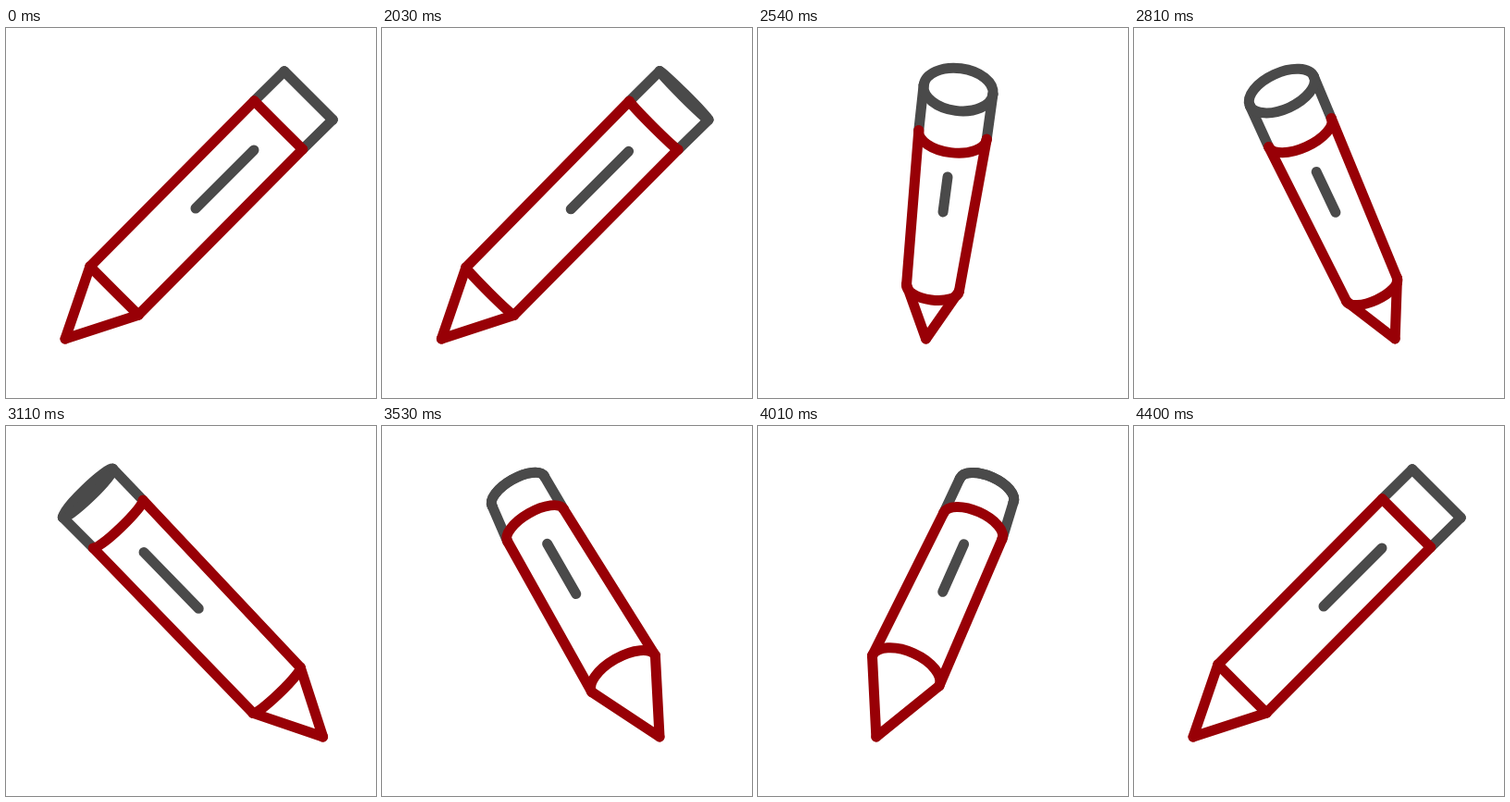
Animation of 400x400 px, one loop 4.43 s. Source, as an HTML page without scripts:

```html
<!DOCTYPE html>
<html lang="en">
<head>
<meta charset="utf-8">
<title>Turning pencil</title>
<style>
@property --turn { syntax: "<angle>"; inherits: true; initial-value: 0deg; }
@property --c { syntax: "<number>"; inherits: true; initial-value: 1; }
@property --s { syntax: "<number>"; inherits: true; initial-value: 0; }
@property --s2 { syntax: "<number>"; inherits: true; initial-value: 0; }
@property --k { syntax: "<number>"; inherits: true; initial-value: 0; }
@property --d { syntax: "<number>"; inherits: true; initial-value: 0; }
@property --ux { syntax: "<number>"; inherits: true; initial-value: 1; }
@property --uy { syntax: "<number>"; inherits: true; initial-value: 0; }

html, body { margin: 0; width: 100%; height: 100%; overflow: hidden; background: #fff; }

svg {
  display: block;
  width: 100%;
  height: 100%;
  fill: none;
  stroke-width: 11;
  stroke-linecap: round;
  animation: turn 4430ms infinite;

  /* Harmonics of the turn */
  --c: cos(var(--turn));
  --s: sin(var(--turn));
  --s2: calc(var(--s) * var(--s));
  --k: calc(cos(3 * var(--turn)) - var(--c));
  --d: sin(2 * var(--turn));

  /* Centre and half width of each section, from point to eraser */
  --tip-x: calc(205 - 141 * var(--c) + 2.3 * var(--k));
  --tip-y: 336;
  --neck-x: calc(205 - 88 * var(--c) + 1.8 * var(--k) - 3.8 * var(--d));
  --neck-y: calc(284 + 10.7 * var(--s) - 13.9 * var(--s2));
  --neck-w: calc(37 - 5.6 * var(--s) - 2.9 * var(--s2));
  --band-x: calc(205 + 89.5 * var(--c) + 13.4 * var(--k) - 1 * var(--d));
  --band-y: calc(105 + 2.9 * var(--s) + 7.8 * var(--s2));
  --band-w: calc(37 + 1.5 * var(--s) - 1.5 * var(--s2));
  --end-x: calc(205 + 122 * var(--c) + 13.2 * var(--k) + 1.7 * var(--d));
  --end-y: calc(73 - .9 * var(--s) - 5.7 * var(--s2));
  --end-w: calc(37 + 3.7 * var(--s) - 3 * var(--s2));
  --end-depth: calc(20.5 + 2.8 * var(--s));

  /* Unit vector across the pencil */
  --dx: calc(var(--end-x) - var(--tip-x));
  --dy: calc(var(--tip-y) - var(--end-y));
  --ux: calc(var(--dy) / hypot(var(--dx), var(--dy)));
  --uy: calc(var(--dx) / hypot(var(--dx), var(--dy)));
}

@keyframes turn {
  0%, 45.1% { --turn: 0deg; animation-timing-function: steps(80); }
  99.3%, 100% { --turn: 360deg; }
}

path { vector-effect: non-scaling-stroke; }
.red { stroke: #980006; }
.gray { stroke: #4a4a4a; }

.tip { --x: var(--tip-x); --y: var(--tip-y); --w: 0; --to-x: var(--neck-x); --to-y: var(--neck-y); --to-w: var(--neck-w); }
.body { --x: var(--neck-x); --y: var(--neck-y); --w: var(--neck-w); --to-x: var(--band-x); --to-y: var(--band-y); --to-w: var(--band-w); }
.eraser { --x: var(--band-x); --y: var(--band-y); --w: var(--band-w); --to-x: var(--end-x); --to-y: var(--end-y); --to-w: var(--end-w); }
.slot {
  --w: 0;
  --to-w: 0;
  --x: calc(268 - 63 * (1 - var(--c)) + 13.3 * var(--k) - 5.5 * var(--d));
  --y: calc(132 + 16.3 * var(--s) + 13.2 * var(--s2));
  --to-x: calc(205 + 6 * var(--k) - 4.3 * var(--d));
  --to-y: calc(195 + 11.7 * var(--s) - 7.8 * var(--s2));
}

.left { --side: -1; }
.right { --side: 1; }
.line {
  --x1: calc(var(--x) + var(--side) * var(--w) * var(--ux));
  --y1: calc(var(--y) + var(--side) * var(--w) * var(--uy));
  --lx: calc(var(--to-x) + var(--side) * var(--to-w) * var(--ux) - var(--x1));
  --ly: calc(var(--to-y) + var(--side) * var(--to-w) * var(--uy) - var(--y1));
  transform: matrix(calc(var(--lx)), calc(var(--ly)), calc(-1 * var(--ly)), calc(var(--lx)), calc(var(--x1)), calc(var(--y1)));
}

.neck { --x: var(--neck-x); --y: var(--neck-y); --w: var(--neck-w); --v: calc(var(--s) * (19.3 - 6.2 * var(--s)) + .05); }
.band { --x: var(--band-x); --y: var(--band-y); --w: var(--band-w); --v: calc(var(--s) * 19.5 + .05); }
.front, .back { --x: var(--end-x); --y: var(--end-y); --w: var(--end-w); }
.front { --v: calc(var(--s) * var(--end-depth) + .05); }
.back { --v: calc(-1 * max(var(--s), -1 * var(--s)) * var(--end-depth) - .05); }
.arc {
  transform: matrix(
    calc(var(--w) * var(--ux)), calc(var(--w) * var(--uy)),
    calc(-1 * var(--v) * var(--uy)), calc(var(--v) * var(--ux)),
    calc(var(--x)), calc(var(--y)));
}
</style>
</head>
<body>
<svg viewBox="0 0 400 400">
  <g class="gray">
    <path class="line eraser left" d="M0 0H1"/>
    <path class="line eraser right" d="M0 0H1"/>
    <path class="arc back" d="M-1 0A1 1 0 0 0 1 0"/>
    <path class="arc front" d="M-1 0A1 1 0 0 0 1 0"/>
    <path class="line slot right" d="M0 0H1"/>
  </g>
  <g class="red">
    <path class="line tip left" d="M0 0H1"/>
    <path class="line tip right" d="M0 0H1"/>
    <path class="line body left" d="M0 0H1"/>
    <path class="line body right" d="M0 0H1"/>
    <path class="arc neck" d="M-1 0A1 1 0 0 0 1 0"/>
    <path class="arc band" d="M-1 0A1 1 0 0 0 1 0"/>
  </g>
</svg>
</body>
</html>
```
